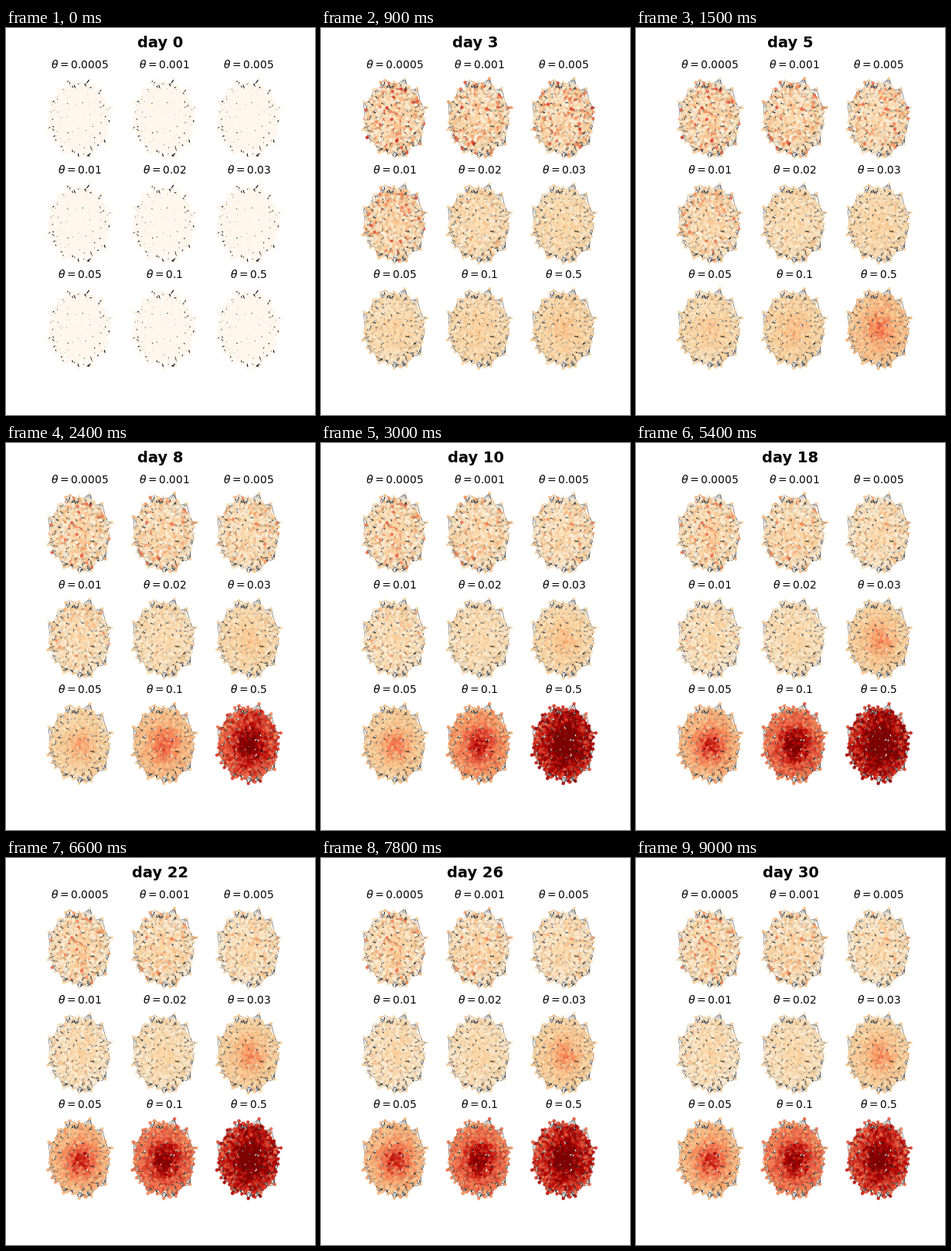
A matplotlib script that plays this animation: 400 px wide and 500 px high, repeating every 9300 ms.

```python
import numpy as np
import matplotlib.pyplot as plt
from matplotlib.animation import FuncAnimation
from matplotlib.collections import LineCollection

DAYS = 31
N = 800
THETAS = [0.0005, 0.001, 0.005, 0.01, 0.02, 0.03, 0.05, 0.1, 0.5]
CRITICAL = 0.02  # infections spread through the network above this


def make_layout(rng):
    """Spiral of nodes filling a disc, ragged towards the rim."""
    i = np.arange(N)
    q = (i + 0.5) / N
    r = 0.87 * q**0.53 + 0.17 * q**7 * rng.random(N)
    a = i * np.pi * (3 - 5**0.5)
    pos = np.column_stack([r * np.cos(a), r * np.sin(a)])
    pos += rng.normal(0, 0.032, pos.shape)
    lo, hi = pos.min(axis=0), pos.max(axis=0)
    return rng.permutation(2 * (pos - lo) / (hi - lo) - 1)


def make_edges(pos, rng):
    """Short links for every node first, then longer ones."""
    dist = np.hypot(*(pos[:, None] - pos[None]).transpose(2, 0, 1))
    near = dist.argsort(axis=1)
    nodes = np.arange(N)
    ends = [near[nodes, rng.integers(1, k, N)] for k in (14, 30, 40, 50)]
    return np.concatenate([np.stack([pos, pos[e]], axis=1) for e in ends])


rng = np.random.default_rng(12)
pos = make_layout(rng)
edges = make_edges(pos, rng)
core_dist = np.hypot(pos[:, 0] - 0.04, pos[:, 1] + 0.04)
glow = np.exp(-(core_dist / 0.48) ** 2)


class Panel:
    def __init__(self, ax, theta):
        self.theta = theta
        self.u = rng.random((3, N))
        self.spots = np.minimum(rng.exponential(1, N), 4)
        ax.set_title(rf"$\theta = {theta}$", fontsize=10)
        ax.set(xlim=(-1.1, 1.1), ylim=(-1.1, 1.1))
        ax.axis("off")
        self.lines = LineCollection(edges, colors="black", zorder=1)
        ax.add_collection(self.lines)
        self.dots = ax.scatter(*pos.T, c=np.zeros(N), s=5, cmap="OrRd",
                               vmin=0, vmax=1, linewidths=1,
                               edgecolors="face", zorder=2)

    def scattered(self, day):
        """Isolated cases that slowly die out, strongest at low theta."""
        patchy = 1 / (1 + (self.theta / 0.016) ** 4)
        floor = 0.3 + 0.4 * np.exp(-self.theta / 0.005)
        decay = floor + (1 - floor) * np.exp(-max(0, day - 3) / 5)
        base = 0.08 * (1 - patchy) + 0.15 * self.u[0]
        return base + (0.02 + 0.14 * patchy) * decay * self.spots

    def outbreak(self, day):
        """Logistic growth from the core outwards."""
        excess = max(0, self.theta - CRITICAL)
        rim = 0.66 * (1 - np.exp(-excess / 0.09))
        core = 0.08 + 0.47 * (1 - np.exp(-excess / 0.02))
        mid = 6.8 + 5 * np.exp(-excess / 0.1)
        grow = 1 / (1 + np.exp((mid - day) / (0.19 * mid)))
        fade = 1 - 0.018 * rim * max(0, day - 13)
        spread = rim * grow * (0.75 + 0.5 * self.u[1])
        heart = core * grow**0.5 * glow * (0.6 + 0.8 * self.u[2])
        return fade * (spread + heart)

    def draw(self, day):
        start = day == 0
        level = self.scattered(day) + self.outbreak(day)
        level *= 1 - np.exp(-day / 0.9)
        self.lines.set_segments(edges[:N] if start else edges)
        self.lines.set_linewidth(0.8 if start else 0.3)
        self.dots.set_alpha(1 if start else 0.78)
        self.dots.set_array(np.clip(level, 0, 1))


fig, axes = plt.subplots(3, 3, figsize=(4, 5), dpi=100)
heading = fig.suptitle("day 0", fontsize=14, fontweight="bold")
panels = [Panel(ax, theta) for ax, theta in zip(axes.flat, THETAS)]


def update(day):
    heading.set_text(f"day {day}")
    for panel in panels:
        panel.draw(day)


anim = FuncAnimation(fig, update, frames=DAYS, interval=300,
                     repeat=True, repeat_delay=0)
plt.show()
```
